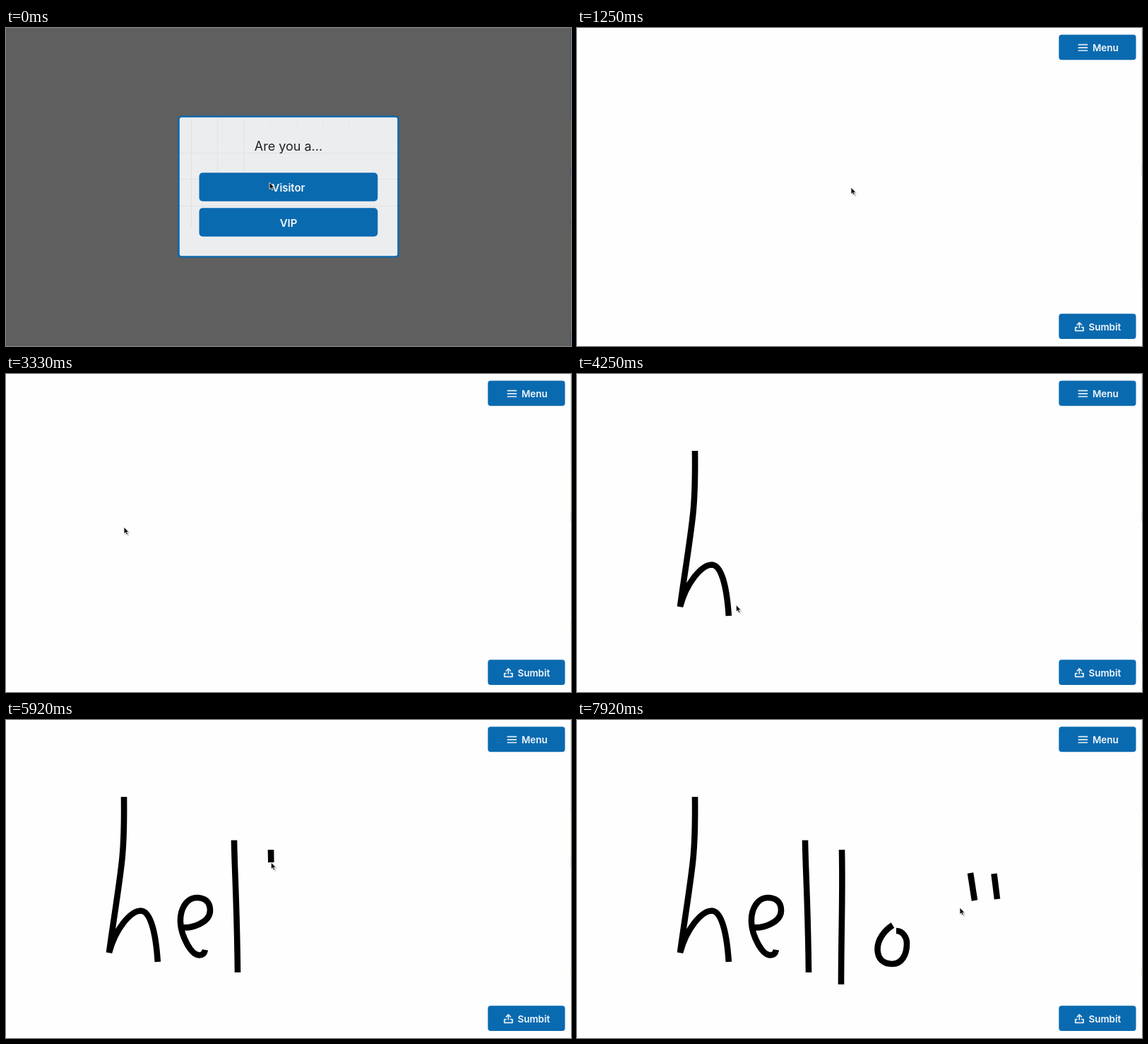
Write an HTML page that moves like this. It is 800 px wide and 451 px high and loops after 8 s.

```html
<!DOCTYPE html>
<html lang="en">
<head>
<meta charset="utf-8">
<title>Sketch pad</title>
<style>
  html, body { margin: 0; width: 100%; height: 100%; overflow: hidden; background: #fefefe; }
  svg { display: block; width: 100%; height: 100%; }
  text { font-family: Inter, "Open Sans", sans-serif; font-weight: 600; fill: #f4f8fb; }
  .btn { fill: #0a6ab0; }
  .icon { fill: none; stroke: #e6f0f7; stroke-width: 1.7; stroke-linecap: round; stroke-linejoin: round; }
  .ink { fill: none; stroke: #000; stroke-width: 8.6; stroke-linejoin: miter; }
</style>
</head>
<body>
<svg viewBox="0 0 800 451" preserveAspectRatio="none">
  <rect width="800" height="451" fill="#fefefe"/>

  <g id="board">
    <g id="edge">
      <path d="M799.5 0V130" stroke="#dbe6ee"/>
      <path d="M799.5 130V195M799.5 350V366" stroke="#f6f3d8"/>
      <path d="M799.5 195V209" stroke="#d9dde2"/>
      <path id="edgeTail" d="M799.5 273V350" stroke="#f6f3d8"/>
    </g>
    <g id="ink"></g>
    <rect class="btn" x="682.3" y="9.5" width="109.2" height="35.8" rx="4"/>
    <path class="icon" d="M710.3 23.7H722.4M710.3 27.9H722.4M710.3 32H722.4"/>
    <text x="730" y="33" font-size="13.4">Menu</text>
    <rect class="btn" x="682.3" y="405.2" width="109.2" height="35.8" rx="4"/>
    <path class="icon" d="M711.3 425V418.3M708.2 421L711.3 417.9L714.4 421M708 424.6H705.7V429.3H717V424.6H714.6"/>
    <text x="724.6" y="428.8" font-size="13.4">Sumbit</text>
  </g>

  <g id="dialog">
    <rect width="800" height="451" fill="#5f5f5f"/>
    <path d="M799.5 0V130M799.5 198V209M799.5 273V281M799.5 430V451" stroke="#3f5478"/>
    <path d="M799.5 130V195M799.5 285V366" stroke="#6b6240"/>
    <rect x="244.5" y="125.5" width="311" height="199" rx="4" fill="#ecedef" stroke="#0f68ab" stroke-width="2.6"/>
    <path d="M262.5 130V282M299.5 130V205M336.5 130V205M246 177.5H554M246 214.5H554M246 252.5H554" stroke="#dfe2e6" fill="none"/>
    <path d="M374.5 130V150M411.5 130V150M448.5 130V150M485.5 130V150" stroke="#e6e8ea"/>
    <text x="400" y="174" font-size="18" text-anchor="middle" style="font-weight:400;fill:#202124">Are you a...</text>
    <rect id="visitor" class="btn" x="273.5" y="205.3" width="252.8" height="40.4" rx="5"/>
    <text id="visitorText" x="400" y="231.7" font-size="14.9" text-anchor="middle">Visitor</text>
    <rect class="btn" x="273.5" y="255.3" width="252.8" height="40.4" rx="5"/>
    <text x="400" y="281.5" font-size="15" text-anchor="middle">VIP</text>
  </g>

  <g id="cursor">
    <path d="M1.5 2.5V11.6L3.8 9.8L5.5 13L7.4 12L5.8 9.2H8.6Z" fill="#000" opacity=".2"/>
    <path d="M0 0V9.6L2.2 7.8L3.7 11L5.5 10.2L4 7.2H7Z" fill="#111" stroke="#f4f4f4" stroke-width=".8"/>
  </g>
</svg>
<script>
const LOOP = 8000, STEP = 1000 / 12;
const OPENED = 1250, PRESSED = 1080;
const $ = id => document.getElementById(id);

// Pen strokes: start, end, path
const strokes = [
  [3500, 4160, "M167 109C167.5 150 167 170 164.5 196C161.5 228 151 292 146 330C155 296 176 271 191 270.5C204 271 212 300 214.8 343"],
  [4400, 4840, "M248 294C262 296 289 288 289 270C289 256 279 252 270 252C256 252 246 268 247 287C248 306 262 334 274 333.5C278 333.5 281 331 282 326"],
  [5320, 5660, "M323 170.5C323.5 210 327 260 328 358"],
  [5880, 6150, "M375 184C376.5 250 374 300 374 375"],
  [6290, 6660, "M447 291C436 298 425 311 425.5 326C426 338 433 346 446 346C460 346 467 333 467 317C467 308 461 299 452 299"],
  [6980, 7160, "M557 217L563 256"],
  [7290, 7460, "M590.5 218L595 254"]
].map(([from, to, d]) => {
  const el = document.createElementNS("http://www.w3.org/2000/svg", "path");
  el.setAttribute("d", d);
  el.setAttribute("class", "ink");
  $("ink").append(el);
  const len = el.getTotalLength();
  const at = s => { const p = el.getPointAtLength(s); return [p.x, p.y]; };
  return { el, from, to, len, at };
});

// Resting points of the pointer; stroke ends are added below
const stops = [
  [0, 373, 219], [100, 373, 219], [850, 388, 226], [1700, 388, 226],
  [3080, 164, 219], [3250, 167, 217], [3340, 167, 217],
  [5000, 322, 173], [5250, 323, 170], [7800, 542, 266], [LOOP, 542, 266]
];
for (const s of strokes) stops.push([s.from, ...s.at(0)], [s.to, ...s.at(s.len)]);
stops.sort((a, b) => a[0] - b[0]);

const clamp = v => Math.max(0, Math.min(1, v));
const smooth = v => v * v * (3 - 2 * v);
const pen = (s, t) => {
  const v = clamp((t - s.from) / (s.to - s.from));
  return s.len * (v + smooth(v)) / 2;
};

function pointer(t) {
  const s = strokes.find(s => t >= s.from && t <= s.to);
  if (s) return s.at(pen(s, t));
  const i = stops.findIndex(p => p[0] > t);
  const [t0, x0, y0] = stops[i - 1], [t1, x1, y1] = stops[i];
  const v = smooth((t - t0) / (t1 - t0));
  return [x0 + (x1 - x0) * v, y0 + (y1 - y0) * v];
}

function draw(t) {
  const open = t >= OPENED - 4, down = t >= PRESSED;
  $("dialog").style.display = open ? "none" : "";
  $("board").style.display = open ? "" : "none";
  $("visitor").style.fill = down ? "#0d5289" : "";
  $("visitorText").style.fill = down ? "#c9d3dc" : "";
  $("edgeTail").style.display = t < 2550 ? "" : "none";
  for (const s of strokes) {
    const n = pen(s, t);
    s.el.style.display = n > 0 ? "" : "none";
    s.el.setAttribute("stroke-dasharray", n >= s.len ? "none" : `${n} ${s.len + 20}`);
  }
  const [x, y] = pointer(t);
  $("cursor").setAttribute("transform", `translate(${x} ${y})`);
}

const start = performance.now();
function tick() {
  const t = (performance.now() - start) % LOOP;
  draw(Math.min(95, Math.floor((t + 4) / STEP)) * STEP);
  requestAnimationFrame(tick);
}
tick();
</script>
</body>
</html>
```
